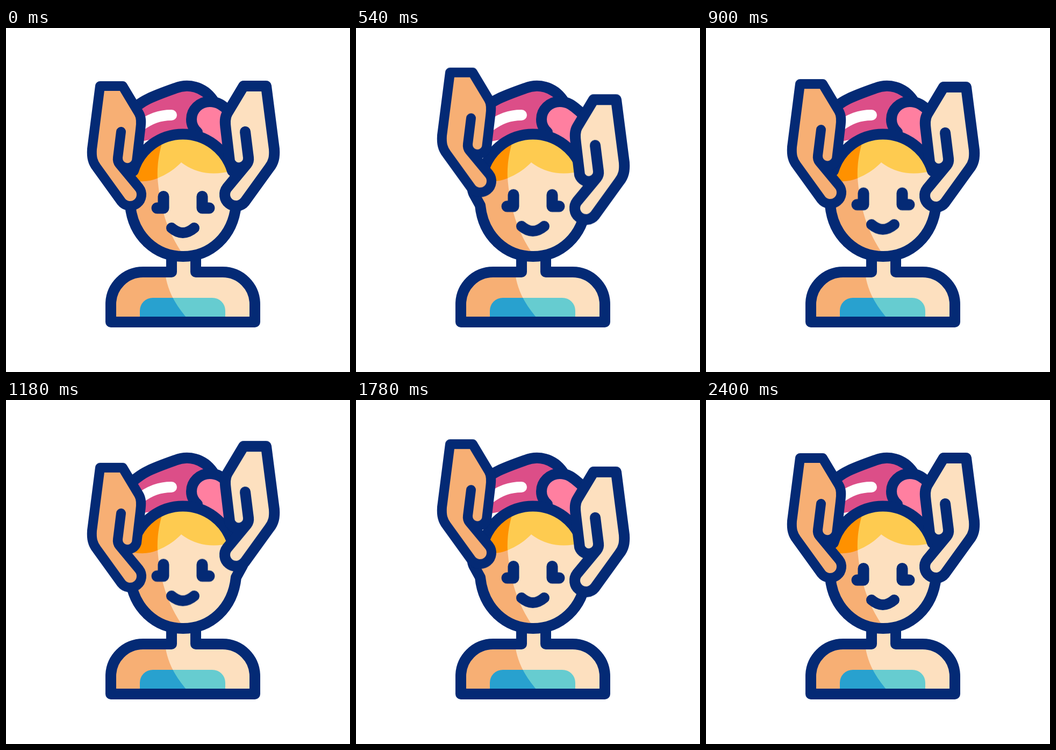
Animation of 640 by 640 pixels, one loop 2.42 s. Source, as an HTML page:

```html
<!DOCTYPE html>
<html lang="en">
<head>
<meta charset="utf-8">
<title>Head massage</title>
<style>
  html, body { margin: 0; width: 100%; height: 100%; overflow: hidden; background: #fff; }
  svg { display: block; width: 100vw; height: 100vh; }
  .line { fill: none; stroke: #042a75; stroke-width: 20; stroke-linecap: round; stroke-linejoin: round; }
  .light { fill: #fde0bf; }
  .dark { fill: #f7af74; }
</style>
</head>
<body>
<svg viewBox="0 0 640 640">
  <defs>
    <path id="hand" stroke="#042a75" stroke-linecap="round" stroke-linejoin="round"
      d="M214 193L208 241A18 18 0 0 0 243 248L250 189C252 175 252 166 247 158L217 108H175L160 225C159 240 161 250 169 260L214.500 323A21 21 0 0 0 247.500 297L211 253Q207 248 208 241"/>
  </defs>

  <!-- body -->
  <path class="light" d="M195 547V514A60 60 0 0 1 255 454H308V420H353V454H403A60 60 0 0 1 463 514V547Z"/>
  <path class="dark" d="M195 547V514A60 60 0 0 1 255 454H296C299 485 313 513 341 547Z"/>
  <path fill="#66ccd0" d="M300 502H384A24 24 0 0 1 408 526V545H300Z"/>
  <path fill="#28a1cf" d="M249 545V526A24 24 0 0 1 273 502H310.500Q320 521 341 545Z"/>
  <path class="line" d="M308 425V454H255A60 60 0 0 0 195 514V547H463V514A60 60 0 0 0 403 454H353V425"/>

  <!-- towel -->
  <path fill="#dc4e88" d="M230 215C228 175 230 155 236 151C255 135 267 129 315 112C338 103 367 108 385 134L370 200L330 196Z"/>
  <path fill="none" stroke="#fff" stroke-width="20" stroke-linecap="round" d="M250 182C268 169 285 162 308 162"/>
  <path class="line" d="M230 215C228 175 230 155 236 151C255 135 267 129 315 112C338 103 367 108 385 134"/>
  <path fill="#ff7fa0" d="M356 194Q345 184 345 170A34 33 0 0 1 379 137C397 137 406 147 419 158C430 170 432 190 430 240Z"/>
  <path class="line" d="M356 194Q345 184 345 170A34 33 0 0 1 379 137C397 137 406 147 419 158C430 170 432 190 430 230"/>

  <!-- head -->
  <path class="light" d="M231 330L233 292A96 96 0 0 1 425 292L428 330C422 388 380 425 329.500 425C279 425 237 388 231 330Z"/>
  <path class="dark" d="M292 204C281 245 281 272 283 290C287 330 298 378 332 425C279 425 237 388 231 330L233 292A96 96 0 0 1 292 204Z"/>
  <path fill="#ff9100" d="M300 202V266L282 279.500Q262 288 238 284V250Z"/>
  <path fill="#fecb50" d="M294 202Q329 190 366 202L420 250V266Q365 280 326 250Q308 269 282 279.500C281 256 284 232 294 202Z"/>
  <path class="line" d="M237 266A96 96 0 0 1 421 266"/>
  <path class="line" d="M218 280Q214 300 220 310L231 330C237 388 279 425 329.500 425C380 425 422 388 428 330L439 310Q445 300 441 280"/>

  <g id="face" class="line">
    <path stroke-width="21" d="M293 313.500V335H281M365 313.500V335H378"/>
    <path d="M308 372Q329 390 350 372"/>
  </g>

  <g id="left"><use href="#hand" class="dark" stroke-width="18"/></g>
  <g id="right"><use href="#hand" class="light" stroke-width="20" transform="translate(659) scale(-1 1)"/></g>
</svg>
<script>
  const LOOP = 2420;
  const EASE = 'cubic-bezier(.333,0,.667,1)';

  // id: [time in ms, vertical shift]
  const moves = {
    left: [[0, 0], [600, -26], [1200, 18], [1800, -26], [2400, 0], [LOOP, 0]],
    right: [[0, 0], [600, 26], [1200, -22], [1800, 26], [2400, 0], [LOOP, 0]],
    face: [[0, 0], [1200, -7.5], [2400, 0], [LOOP, 0]]
  };

  for (const [id, steps] of Object.entries(moves)) {
    const frames = steps.map(([t, y]) => ({
      offset: t / LOOP,
      transform: `translateY(${y}px)`,
      easing: EASE
    }));
    const anim = document.getElementById(id).animate(frames, { duration: LOOP, iterations: Infinity });
    anim.startTime = 0;
  }
</script>
</body>
</html>
```
